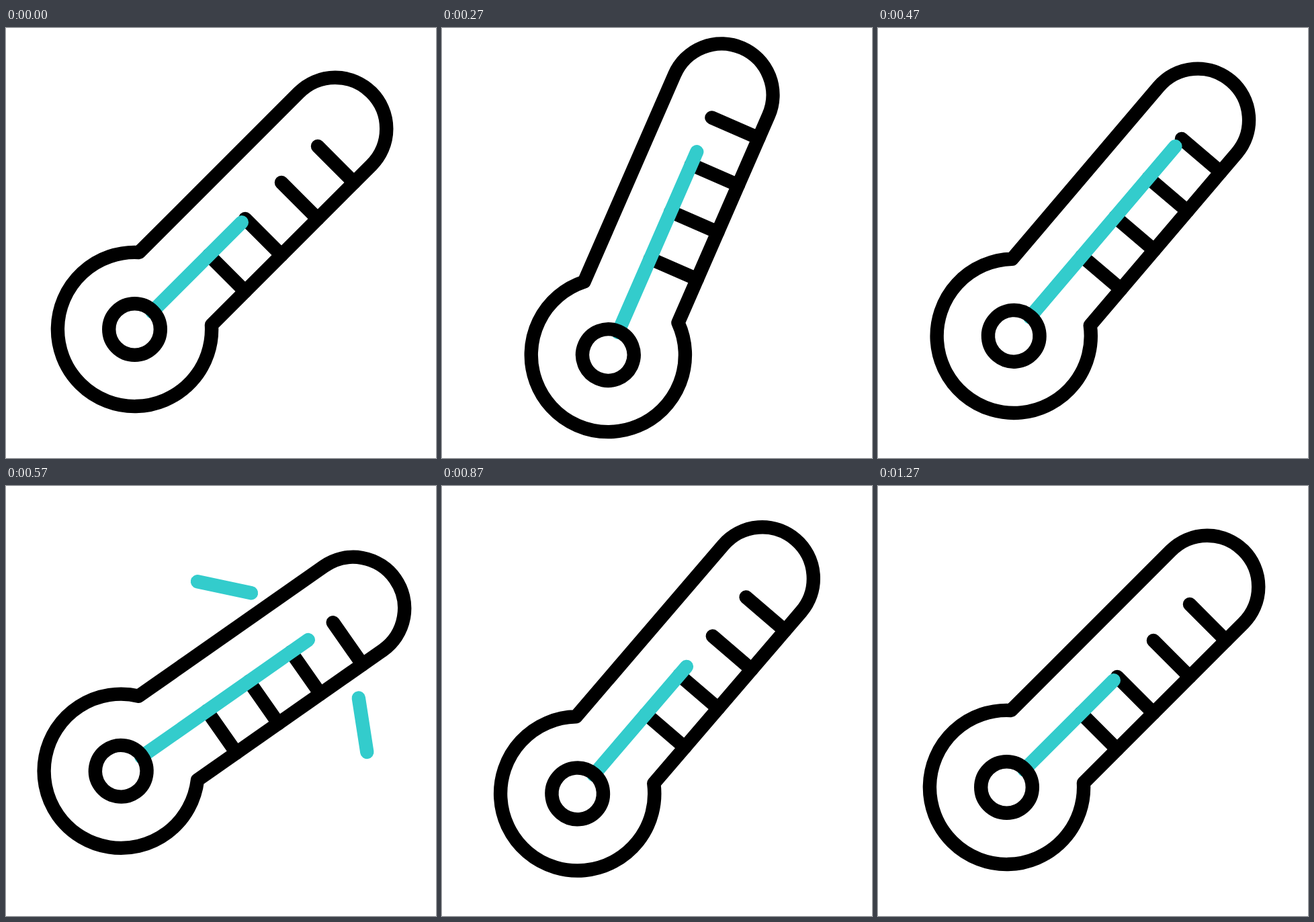
An HTML page that plays this animation: 640x640 px, repeating every 1670 ms.

```html
<!DOCTYPE html>
<html lang="en">
<head>
<meta charset="utf-8">
<title>Thermometer</title>
<style>
  html, body { margin: 0; height: 100%; overflow: hidden; background: #fff; }
  svg { display: block; width: 100vw; height: 100vh; }
  path, circle { fill: none; stroke: #000; stroke-width: 20.4; stroke-linecap: round; stroke-linejoin: round; }
  .teal { stroke: #3cc; }
</style>
</head>
<body>
<svg viewBox="0 0 640 640">
  <path id="sparkA" class="teal"/>
  <path id="sparkB" class="teal"/>
  <g id="body">
    <path d="M0-203.6H76.3M0-127.2H76.3M0-50.9H76.3M0 25.5H76.3"/>
    <path d="M-76.3 96.2V-240.4A76.3 76.3 0 0 1 76.3-240.4V96.2A114.6 114.6 0 1 1-76.3 96.2Z"/>
    <path id="mercury" class="teal"/>
    <circle cy="181.7" r="38.3"/>
  </g>
</svg>
<script>
const LOOP = 1670;
const el = id => document.getElementById(id);
const linear = s => s;
const smooth = s => s * s * (3 - 2 * s);

// Keys are [step, value] pairs, one step being 1/30 s.
const tilt = [[0, 45], [10.5, 20], [16.8, 55], [27.3, 40], [32.55, 47], [37.8, 45]];
const level = [[2.1, 43.6], [11.1, 203], [12.6, 203], [28.35, 43.6]];
const sparkHead = [[14.7, 0], [17, 1]];
const sparkTail = [[17, 0], [20, 1]];

function valueAt(keys, step, ease) {
  if (step <= keys[0][0]) return keys[0][1];
  for (let i = 1; i < keys.length; i++) {
    const [t0, a] = keys[i - 1], [t1, b] = keys[i];
    if (step < t1) return a + (b - a) * ease((step - t0) / (t1 - t0));
  }
  return keys[keys.length - 1][1];
}

function drawSpark(id, x, y, dx, dy, step) {
  const tail = valueAt(sparkTail, step, linear);
  const head = valueAt(sparkHead, step, linear);
  el(id).setAttribute('d', head > tail
    ? `M${x + dx * tail} ${y + dy * tail}L${x + dx * head} ${y + dy * head}` : '');
}

function draw(now) {
  // Steps of 1/30 s, rounded to hundredths of a second
  const step = Math.floor((Math.floor(now % LOOP / 10) + 0.5) * 0.3);
  el('body').setAttribute('transform', `translate(320 320) rotate(${valueAt(tilt, step, smooth)})`);
  el('mercury').setAttribute('d', `M0 145V${-valueAt(level, step, linear)}`);
  drawSpark('sparkA', 365, 159.3, -80, -17, step);
  drawSpark('sparkB', 524.8, 315.5, 12.5, 80.5, step);
  requestAnimationFrame(draw);
}
draw(0);
</script>
</body>
</html>
```
